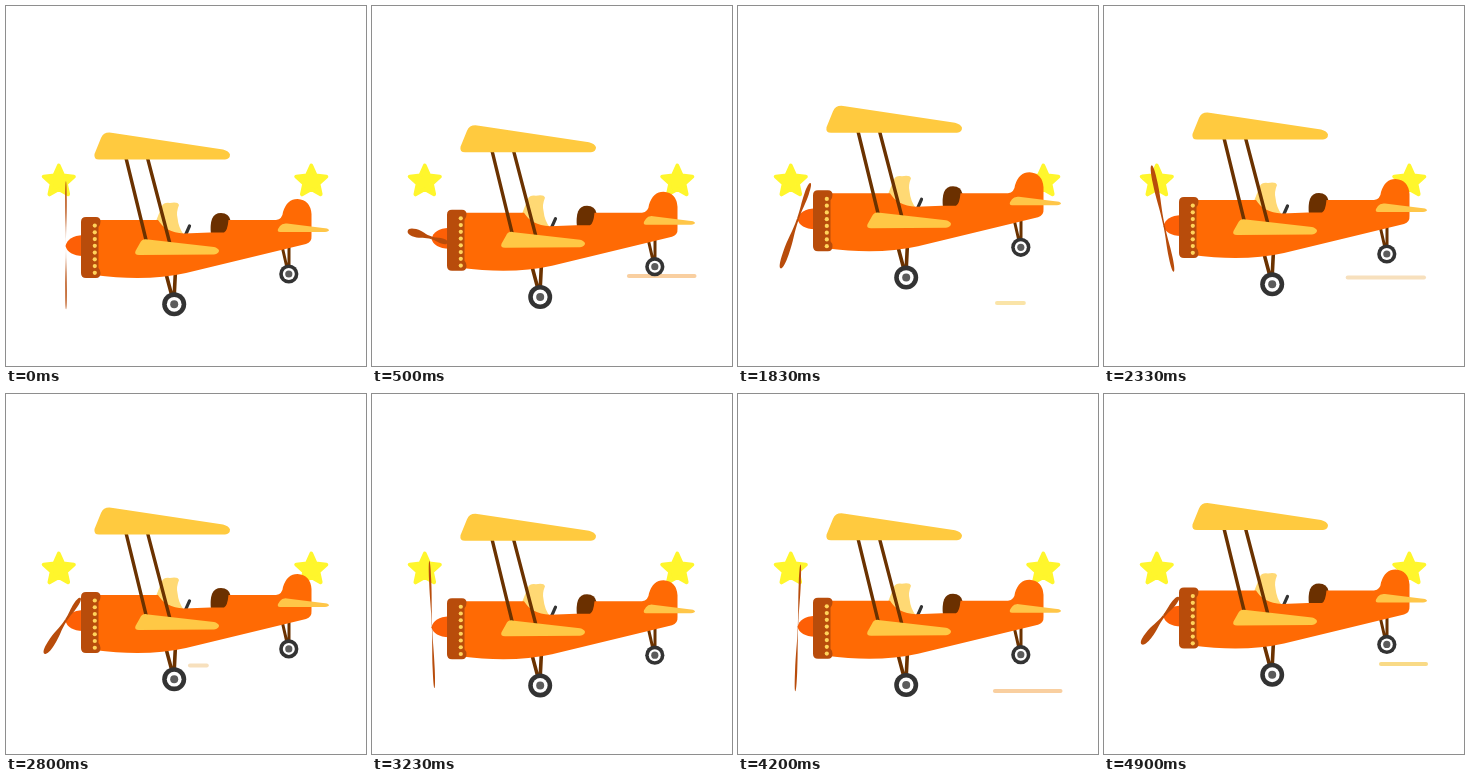
Animation, 360 px wide and 360 px high, one loop 5000 ms. Source, as an HTML page:

```html
<!DOCTYPE html>
<html lang="en">
<head>
<meta charset="utf-8">
<title>Biplane</title>
<style>
html, body { margin: 0; width: 100%; height: 100%; overflow: hidden; background: #fff; }
svg { display: block; width: 100%; height: 100%; }
</style>
</head>
<body>
<svg viewBox="0 0 360 360" xmlns="http://www.w3.org/2000/svg">
  <rect width="360" height="360" fill="#fff"/>
  <g id="stars" fill="#fff62c" stroke="#fff62c" stroke-width="4" stroke-linejoin="round"></g>
  <g id="lines" stroke-width="4" stroke-linecap="round"></g>
  <g id="plane">
    <!-- landing gear -->
    <g stroke="#6b3200" stroke-width="3.6" fill="none">
      <path d="M159 264L167 294M169.5 264L168 294"/>
      <path d="M276 240L281.500 264M283 240L283 264" stroke-width="3"/>
    </g>
    <g id="wheels"></g>

    <!-- nose and propeller -->
    <path d="M77 229Q62 230 59.500 240Q62 249.500 77 250Z" fill="#fd5f06"/>
    <g id="prop" fill="#b84c0b"></g>

    <!-- cockpit -->
    <path d="M150 215L156 200Q158 196 164 197Q172 195.500 173 199Q170 206 171.500 212Q172.500 222 178 229L164 229Z" fill="#ffd974"/>
    <path d="M179.500 229L183.500 220" stroke="#333" stroke-width="3.2" stroke-linecap="round"/>
    <path d="M205 229C203.500 215 206 207 215 207Q223 207 224.500 214.500L222 229Z" fill="#6b3000"/>

    <!-- body -->
    <path d="M88 214H152C157 222 165 227 178 227.500L204 226.500H218Q221.500 225 222.500 214H270Q276.500 213 277 206Q281 193 291.500 193Q304.500 194 305.500 208V230Q306 236 300 238L180 267Q140 276 88 269Z" fill="#ff6a04"/>
    <path d="M274 226L319 226Q323 225.500 323 224Q322 222 317 222L281 217.500Q276 217 274 220L272 223Q271 226 274 226Z" fill="#ffc648"/>
    <path d="M80 211H90Q94.500 211 94.500 215.500Q94.500 219 92.500 221V262Q94.500 264 94.500 267Q94.500 272 90 272H80Q75 272 75 267V216Q75 211 80 211Z" fill="#b84c0b"/>
    <g id="rivets" fill="#ffd35a"></g>

    <!-- wings -->
    <path d="M119.500 150L141.500 240M141 150L164 238" stroke="#6b3200" stroke-width="3.400"/>
    <path d="M133 249L208 248.500Q213 247.500 213 244.500Q212 242 208 241L142 233.500Q136 232 134 237L129.500 245Q128 249 133 249Z" fill="#ffc845"/>
    <path d="M93 153.500L219 153.500Q224 153 224 148.500Q223 145 217 143.500L107 127Q98 125 95 132L88.500 148Q87.500 153.500 93 153.500Z" fill="#ffca3f"/>
  </g>
</svg>
<script>
const LOOP = 5000, CYCLE = 3700, RISE = 27, SPIN = 0.1695;
const NS = "http://www.w3.org/2000/svg";
const $ = id => document.getElementById(id);

function add(parent, tag, attrs) {
  const el = document.createElementNS(NS, tag);
  for (const k in attrs) el.setAttribute(k, attrs[k]);
  return parent.appendChild(el);
}

function star(cx, cy) {
  const pts = [];
  for (let i = 0; i < 10; i++) {
    const r = i % 2 ? 7.4 : 15.8, a = i * Math.PI / 5;
    pts.push((cx + r * Math.sin(a)).toFixed(2) + "," + (cy - r * Math.cos(a)).toFixed(2));
  }
  add($("stars"), "polygon", { points: pts.join(" ") });
}
star(52.8, 175.5);
star(305.3, 175.5);

function wheel(cx, cy, radii) {
  ["#333", "#fff", "#5c5c5c"].forEach((fill, i) =>
    add($("wheels"), "circle", { cx, cy, r: radii[i], fill }));
}
wheel(168.2, 298.3, [12, 7.4, 4]);
wheel(282.8, 268, [9.6, 6, 3.6]);

for (let i = 0; i < 8; i++) add($("rivets"), "circle", { cx: 88.8, cy: 219.6 + i * 6.75, r: 2.1 });

const blades = [-1, 1].map(side => ({ side, el: add($("prop"), "path", {}) }));

// Keys are [time, x]; linear between them
function along(keys, t) {
  if (t <= keys[0][0]) return keys[0][1];
  for (let i = 1; i < keys.length; i++) {
    const [t0, x0] = keys[i - 1], [t1, x1] = keys[i];
    if (t <= t1) return x0 + (x1 - x0) * (t - t0) / (t1 - t0);
  }
  return keys[keys.length - 1][1];
}

// Speed lines: the head runs left, the tail follows; y differs per cycle
const streaks = [
  { color: "#f9cfa0", y: [270, 297],
    head: [[260, 325], [500, 255], [1000, 217], [1180, 210]],
    tail: [[640, 324.5], [1000, 298], [1180, 210]] },
  { color: "#f9da86", y: [297, 270], fade: 0.4,
    head: [[1060, 324], [1200, 275], [1830, 257], [2050, 255]],
    tail: [[1300, 324], [1830, 288], [2050, 255]] },
  { color: "#f7e0bd", y: [271.5, 271.5],
    head: [[2050, 322], [2400, 222], [2800, 182], [2900, 180]],
    tail: [[2350, 322], [2800, 203], [2900, 180]] }
];
for (const s of streaks) s.el = add($("lines"), "path", { stroke: s.color });

function drawBlade({ side, el }, angle) {
  const c = side * Math.cos(angle), s = side * Math.sin(angle);
  const depth = 1 / (1 - 0.22 * c);
  const x = -19 * c * depth, y = 64 * s * depth;
  const r = Math.hypot(x, y);
  const w = (1.5 + 4.7 * Math.abs(c)) * depth / 2;
  const neck = 1.2 * Math.abs(c);
  el.setAttribute("d",
    `M0 ${-neck}C${r * 0.3} ${-neck} ${r * 0.4} ${-w} ${r * 0.7} ${-w}` +
    `C${r * 0.9} ${-w} ${r} ${-w * 0.6} ${r} 0C${r} ${w * 0.6} ${r * 0.9} ${w} ${r * 0.7} ${w}` +
    `C${r * 0.4} ${w} ${r * 0.3} ${neck} 0 ${neck}Z`);
  el.setAttribute("transform", `translate(60 239.3) rotate(${Math.atan2(y, x) * 180 / Math.PI})`);
}

function draw(t) {
  const phase = t % CYCLE, turn = Math.floor(t / CYCLE);
  const lift = RISE * (1 - Math.abs(1 - 2 * phase / CYCLE));
  $("plane").setAttribute("transform", `translate(0 ${-lift})`);

  const angle = (90 + SPIN * t) * Math.PI / 180;
  for (const b of blades) drawBlade(b, angle);

  for (const s of streaks) {
    const x0 = along(s.head, phase), x1 = along(s.tail, phase);
    const shown = x1 - x0 > 4;
    const start = s.tail[0][0], end = s.tail[2][0];
    const gone = Math.min(1, Math.max(0, (phase - start) / (end - start)));
    s.el.setAttribute("d", shown ? `M${x0 + 2} ${s.y[turn]}H${x1 - 2}` : "");
    s.el.setAttribute("opacity", 1 - (s.fade || 0) * gone);
  }
}

function tick() {
  draw(performance.now() % LOOP);
  requestAnimationFrame(tick);
}
tick();
</script>
</body>
</html>
```
